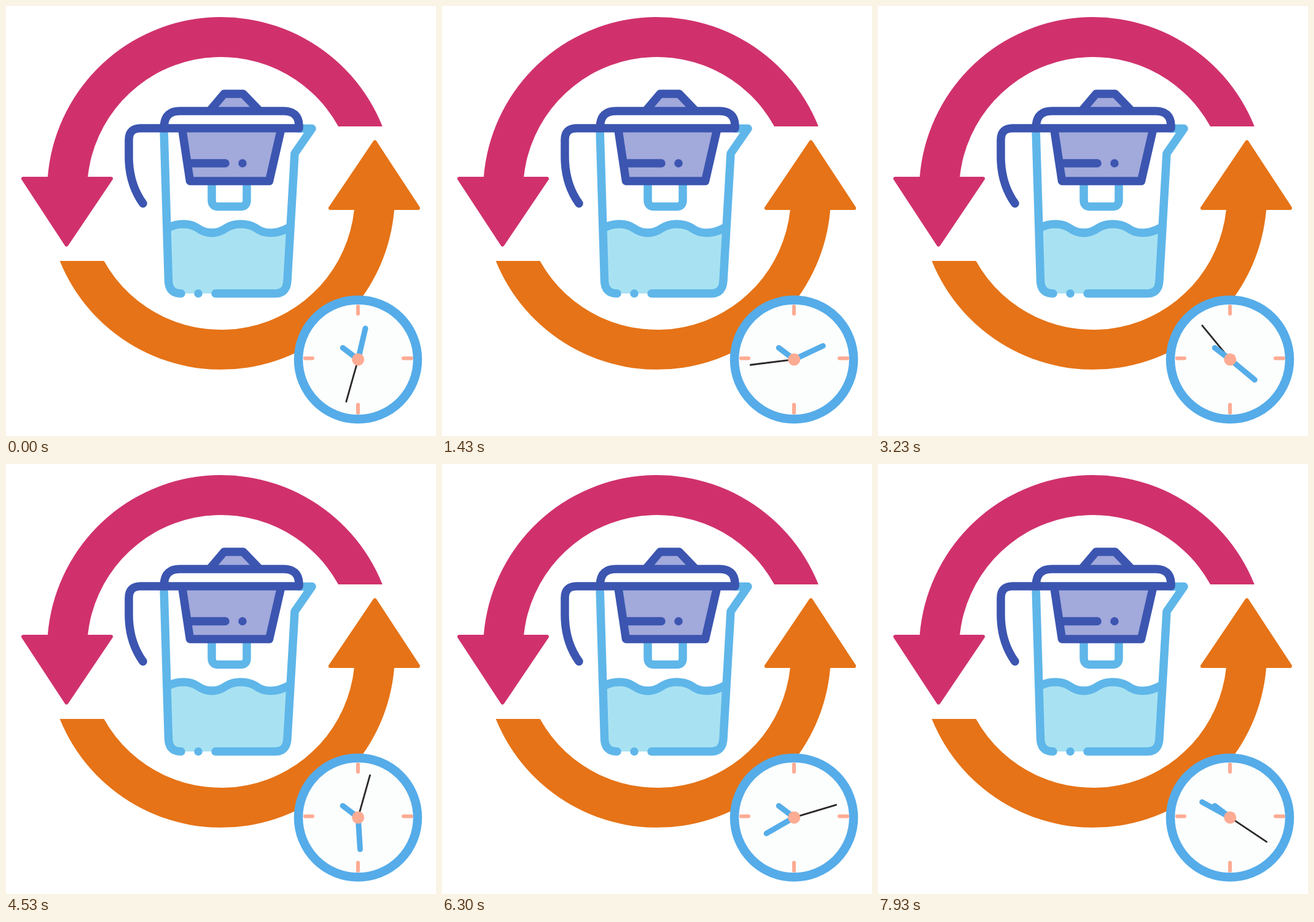
An HTML page that plays this animation: 700 by 700 pixels, repeating every 8000 ms.

```html
<!DOCTYPE html>
<html lang="en">
<head>
<meta charset="utf-8">
<title>Water filter replacement time</title>
<style>
  html, body { margin: 0; width: 100%; height: 100%; overflow: hidden; background: #fff; }
  svg { display: block; width: 100vw; height: 100vh; }
  .pink { fill: #d0316d; stroke: #d0316d; }
  .orange { fill: #e67317; stroke: #e67317; }
  .arrow path { stroke: none; }
  .arrow polygon { stroke-width: 6; stroke-linejoin: round; }
  .line { fill: none; stroke-width: 13.5; stroke-linecap: round; stroke-linejoin: round; }
  .light { stroke: #5fb6e9; }
  .dark { stroke: #3c55b0; }
  .lilac { fill: #a2a9db; }
  .white { fill: #fff; }
  .hand { stroke: #55ade9; stroke-width: 9; stroke-linecap: round; }
  .mark { stroke: #feab93; stroke-width: 6; stroke-linecap: round; }
</style>
</head>
<body>
<svg viewBox="0 0 700 700">
  <g class="arrow pink">
    <path d="M67 278V301A283 283 0 0 1 612.8 196H541A218 218 0 0 0 133.2 278Z"/>
    <polygon points="28,281 171,281 98.5,388.5"/>
  </g>
  <g class="arrow orange">
    <path d="M632 332A283 283 0 0 1 87.6 415H159.5A218 218 0 0 0 566.8 332Z"/>
    <polygon points="528,329 671,329 600.5,221.5"/>
  </g>

  <g id="pitcher">
    <path fill="#a8e2f2" d="M264 361C279 353 299 353 311 361C327 372 343 372 359 361C372 353 392 353 406 361C420 372 440 372 460 361L456 468H270Z"/>
    <g class="line light">
      <path d="M264 361C279 353 299 353 311 361C327 372 343 372 359 361C372 353 392 353 406 361C420 372 440 372 460 361"/>
      <path d="M257 200L264.5 447Q265 468 285 468M313 468h.01M341 468H438Q457 468 458 447L470 240L498 199.5H478"/>
      <path d="M335 288V316Q335 326.5 345 326.5H382Q392 326.5 392 316V288"/>
    </g>
    <g class="line dark">
      <path class="lilac" d="M333 169L355 143H386L411 169"/>
      <path class="lilac" d="M287 202L299.5 285H428.5L447.5 202"/>
      <path d="M302 256H357M385 256h.01"/>
      <path class="white" d="M257.5 199V194Q259 171 283 171H452Q476 171 477 194V199Z"/>
      <path d="M258 199H219Q200 199 200 218V245C200 275 209 302 223 321.5"/>
    </g>
  </g>

  <g id="clock">
    <circle cx="573" cy="575.5" r="97" fill="#fcfdfd" stroke="#55ace9" stroke-width="14.5"/>
    <path class="mark" d="M573 489V501M573 649V662M487 573.5H499M647 573.5H660"/>
    <g transform="translate(573.2 575.4)">
      <line id="second" y2="-71.5" stroke="#2a2828" stroke-width="2.8" stroke-linecap="round"/>
      <line class="hand" x2="-25" y2="-19"/>
      <line id="minute" class="hand" y2="-52"/>
      <circle r="10" fill="#feab93"/>
    </g>
  </g>
</svg>
<script>
  const LOOP = 8000;
  const minute = document.getElementById('minute');
  const second = document.getElementById('second');
  const turn = (hand, angle) => hand.setAttribute('transform', `rotate(${angle})`);

  // Two pictures per 100 ms: one held 30 ms, one held 70 ms.
  const snap = ms => Math.floor(ms / 100) / 10 + (ms % 100 < 30 ? 0 : 1 / 30);

  function draw(ms) {
    const t = snap(ms % LOOP);
    const whole = Math.floor(t + 1e-6);
    turn(minute, 13.2 + 36 * t);
    // Each second: sweep 36 degrees in the first half, rest in the other.
    turn(second, -164.3 + 36 * (whole + Math.min(1, 2 * (t - whole))));
  }

  const start = performance.now();
  function tick() {
    draw(performance.now() - start);
    requestAnimationFrame(tick);
  }
  tick();
</script>
</body>
</html>
```
